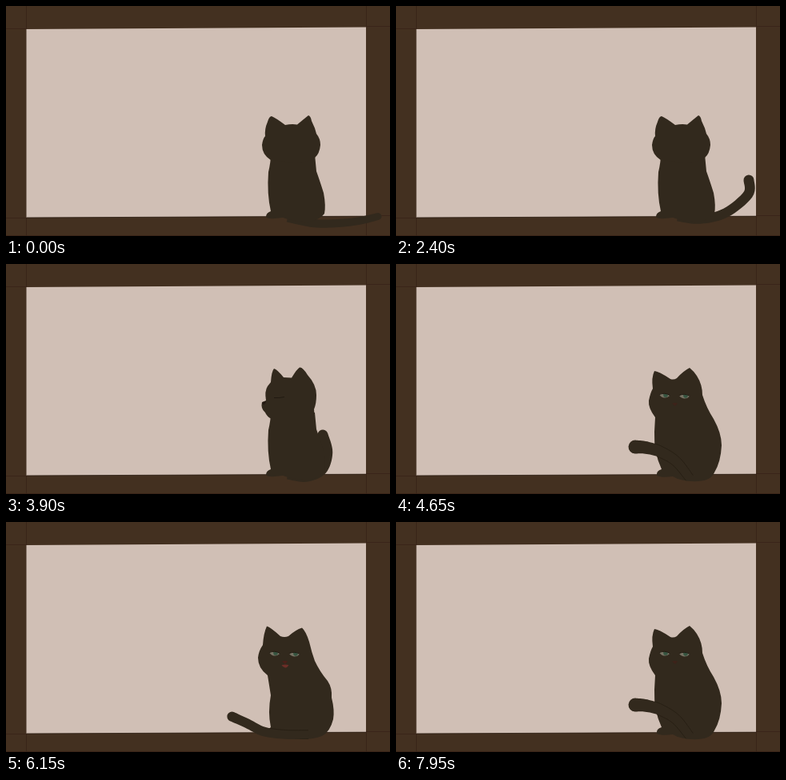
Write an HTML page with a canvas that moves like this. It is 480 px wide and 288 px high and loops after 8000 ms.

```html
<!DOCTYPE html>
<html lang="en">
<head>
<meta charset="utf-8">
<title>Cat on a sill</title>
<style>
html, body { margin: 0; width: 100%; height: 100%; overflow: hidden; background: #433020; }
canvas { display: block; width: 480px; height: 288px; }
</style>
</head>
<body>
<canvas id="stage" width="480" height="288"></canvas>
<script>
const ctx = document.getElementById('stage').getContext('2d');
const LOOP = 8000, STEP = 150;
const FUR = '#32291d', LINE = '#271f14';

const shape = {
  backBody: new Path2D('M331 186Q331 195 328 208Q326 235 331 257Q325 259 325 264Q327 267 336 266L346 265Q362 271 380 270Q393 267 398 260Q400 250 397 234Q392 218 388 207L386 186Z'),
  backHead: new Path2D('M331 193Q320 186 320 174Q321 166 324 163Q323 154 327 145Q329 138 332 138Q337 140 349 149Q357 147.500 364 148.500Q373 141 378 137Q381 138 382 144L386 153L388 160Q393 166 393 174Q392 185 386 190Q380 196 358 196Z'),
  sideHead: new Path2D('M332 194Q326 191 324 186Q318 181 320 173L325 171Q323 159 327 153L331 148Q332 134 335 131Q339 132 347 142L357 142.500Q364 131 367 129.500Q371 129 377 139Q388 151 388 164Q388 175 385 182L386 194Z'),
  sitting: new Path2D('M324 192Q315 180 316 171Q318 161 321 156Q319 142 323 134Q328 134 343 144Q347 145.500 351 143Q359 134 367 130Q372 134 376 140Q383 151 383 164Q388 180 397 194Q407 212 407 227Q406 248 398 261Q394 271 378 272Q357 273 346 266Q332 268 326 265Q325 259 332 257Q322 236 323 210Z'),
  turned: new Path2D('M327 192Q315 183 315 170Q316 161 321 154Q322 139 326 130.500Q331 132 343 143Q348 145 353 143Q362 135 370 132.500Q375 137 379 150Q382 163 386 174Q392 187 402 199Q408 208 407 220Q411 236 409 247Q405 263 395 268Q385 272 370 272Q350 270 343 266L329 265Q325 261 331 257Q327 238 331 217Z')
};

// Tail poses: spine points from root to tip, then tip width
const pose = {
  down: [352,265, 385,272, 415,272, 442,269, 465,263.5, 9],
  rise: [352,265, 385,272.5, 412,269, 435,259, 455,242, 11],
  up:   [352,264, 380,267, 412,259, 440,236, 441,218, 13],
  high: [352,264, 378,267, 405,255, 423,230, 426,202, 13],
  near: [352,264, 375,267, 395,258, 402,236, 396,214, 13],
  tuck: [352,264, 370,267, 383,258, 388,240, 380,226, 12],
  hide: [352,262, 362,263, 374,255, 380,240, 372,228, 12],
  fore: [367,268, 350,245, 334,232, 318,224, 306,218, 16],
  mid:  [367,268, 350,247, 330,235, 313,230, 299,229, 17],
  rest: [378,266, 350,264, 322,263, 300,257, 280,248, 12],
  low:  [378,267, 350,268, 322,268, 300,262, 281,253, 12],
  curl: [378,263, 348,259, 323,240, 309,214, 288,206, 13]
};

const tailKeys = [
  [0, 'down'], [300, 'rise'], [600, 'high'], [900, 'near'], [1200, 'tuck'],
  [1500, 'hide'], [1650, 'hide'], [1800, 'tuck'], [1950, 'near'], [2100, 'high'],
  [2400, 'up'], [2700, 'down'], [3000, 'down'], [3300, 'rise'], [3600, 'high'],
  [3900, 'near'], [4050, 'tuck'], [4200, 'fore'], [4650, 'mid'], [4800, 'rest'],
  [5100, 'low'], [5550, 'rest'], [6000, 'low'], [6750, 'curl'], [7200, 'rest'],
  [7500, 'low'], [7950, 'mid'], [8000, 'mid']
];

function tailAt(t) {
  let i = 0;
  while (i < tailKeys.length - 2 && t >= tailKeys[i + 1][0]) i++;
  const [t0, a] = tailKeys[i], [t1, b] = tailKeys[i + 1];
  const k = (t - t0) / (t1 - t0);
  return pose[a].map((v, n) => v + (pose[b][n] - v) * k);
}

function spline(a, b, c, d, u) {
  return 0.5 * (2 * b + (c - a) * u + (2 * a - 5 * b + 4 * c - d) * u * u
    + (3 * b - a - 3 * c + d) * u * u * u);
}

function tailPath(p) {
  const N = 32, spine = [];
  const axis = (i, o) => p[Math.max(0, Math.min(4, i)) * 2 + o];
  for (let n = 0; n <= N; n++) {
    const s = n / N * 4, i = Math.min(3, Math.floor(s));
    spine.push([0, 1].map(o =>
      spline(axis(i - 1, o), axis(i, o), axis(i + 1, o), axis(i + 2, o), s - i)));
  }
  const path = new Path2D(), left = [], right = [];
  let angle = 0;
  spine.forEach(([x, y], n) => {
    const a = spine[Math.max(0, n - 1)], b = spine[Math.min(N, n + 1)];
    angle = Math.atan2(b[1] - a[1], b[0] - a[0]);
    const r = (11 + (p[10] - 11) * n / N) / 2;
    const dx = -Math.sin(angle) * r, dy = Math.cos(angle) * r;
    left.push([x + dx, y + dy]);
    right.unshift([x - dx, y - dy]);
  });
  left.forEach(q => path.lineTo(...q));
  path.arc(...spine[N], p[10] / 2, angle + Math.PI / 2, angle - Math.PI / 2, true);
  right.forEach(q => path.lineTo(...q));
  return path;
}

function fill(path, color = FUR) {
  ctx.fillStyle = color;
  ctx.fill(path);
}

function stroke(d, color, width = 1) {
  ctx.strokeStyle = color;
  ctx.lineWidth = width;
  ctx.stroke(typeof d === 'string' ? new Path2D(d) : d);
}

function room() {
  ctx.fillStyle = '#433020';
  ctx.fillRect(0, 0, 480, 288);
  fill(new Path2D('M25.500 29L450 26.500V263L25.500 265Z'), '#d0bfb5');
  stroke('M25.500 0V28M25.500 265V288M450.500 0V26M450.500 263V288M0 28.500H26M450 25.500H480M0 265.500H26M450 262.500H480M0 287.500H480', '#382317', 0.8);
  stroke('M25.500 265L450 263.200', '#2b1d13', 0.8);
}

function eye(x, y, open, tilt) {
  ctx.save();
  ctx.translate(x, y);
  ctx.rotate(tilt);
  const lid = new Path2D(`M-7 -1Q-1 ${-2 - 2.5 * open} 6.500 0Q3 3.500 -1 3Q-5 2.500 -7 -1Z`);
  fill(lid, '#777263');
  ctx.clip(lid);
  ctx.beginPath();
  ctx.arc(1, -0.5, 2.8, 0, 7);
  ctx.fillStyle = '#365440';
  ctx.fill();
  if (open < 1) {
    ctx.fillStyle = FUR;
    ctx.fillRect(-8, -5, 16, 4.6);
  }
  ctx.restore();
  stroke(`M${x - 7} ${y - 1}Q${x} ${y - 1 - 3 * open} ${x + 6.5} ${y}`, '#211a11');
}

function face(open, mouth) {
  eye(336, 164.5, open, 0.05);
  eye(361, 165.5, open, -0.05);
  fill(new Path2D('M345 174.500Q349 173 352 174.500L349 178Z'), mouth ? '#492019' : '#3d231a');
  if (mouth) fill(new Path2D('M344.500 179Q349 178 353.500 179Q351 183 349 182.500Q346 182 344.500 179Z'), '#6c2e27');
}

function draw(t) {
  room();
  const tail = tailPath(tailAt(t));
  if (t < 4200) {
    fill(tail);
    fill(shape.backBody);
    const side = t >= 3000;
    fill(side ? shape.sideHead : shape.backHead);
    if (side) {
      stroke('M335 167.500Q342 168 348 166.500', '#211a11');
      fill(new Path2D('M320 173.500L325 171.500Q325 176 321 176Z'), '#261b14');
    }
    return;
  }
  const turned = t >= 4800 && t < 7500;
  const body = turned ? shape.turned : shape.sitting;
  fill(body);
  fill(tail);
  ctx.save();
  ctx.clip(body);
  stroke(tail, LINE);
  ctx.restore();
  face(t >= 6450 && t < 7050 ? 0.4 : 1, turned);
}

function tick() {
  const t = performance.now() % LOOP;
  draw(Math.floor(t / STEP) * STEP);
  requestAnimationFrame(tick);
}
tick();
</script>
</body>
</html>
```
